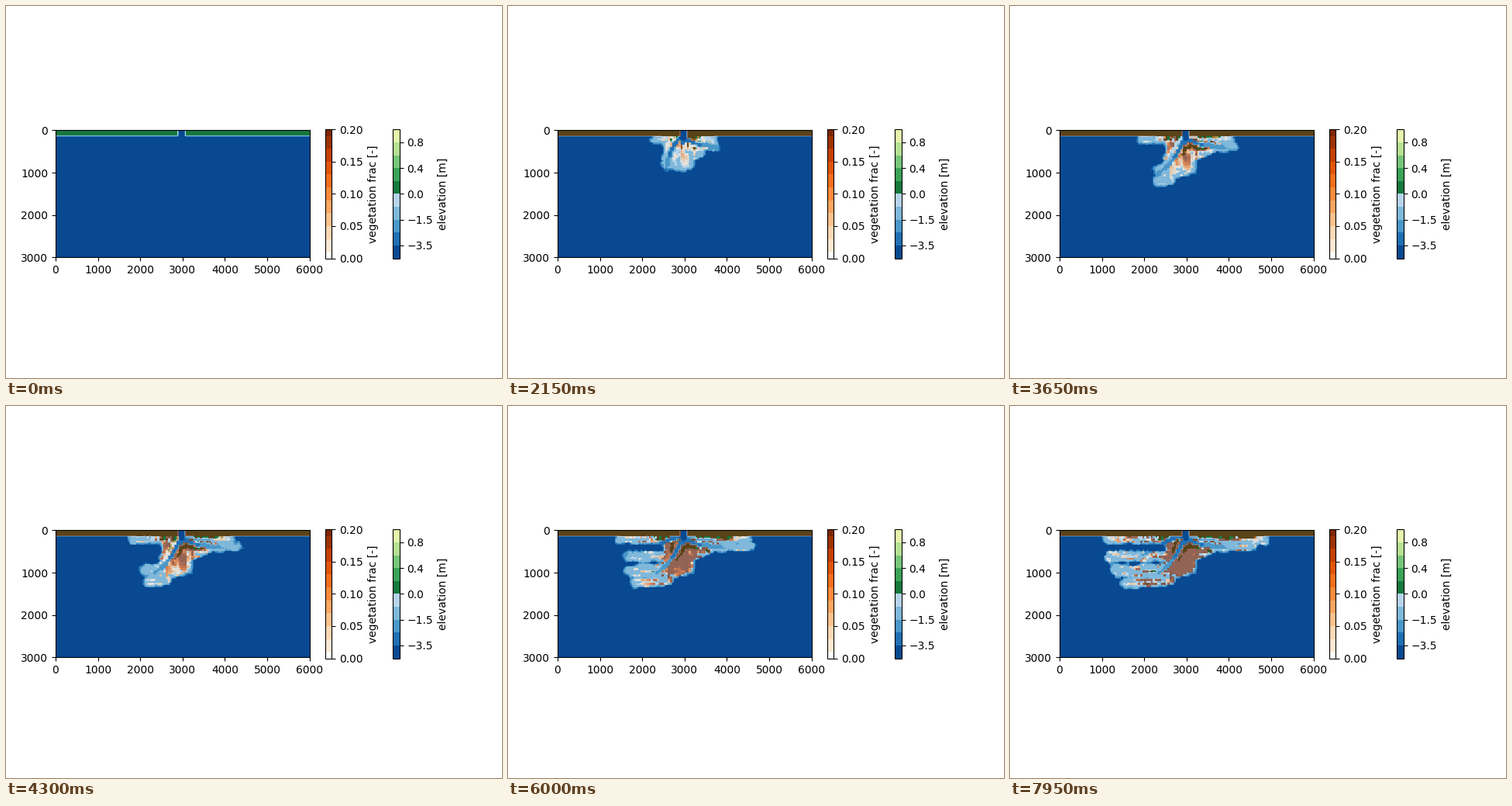
These frames come from a looping animation (640x480 px, 8000 ms). A matplotlib script:

```python
import numpy as np
import matplotlib.pyplot as plt
from matplotlib.animation import FuncAnimation
from matplotlib.cm import ScalarMappable
from matplotlib.colors import BoundaryNorm, ListedColormap

FRAMES, STEP = 160, 50
ROWS, COLS = 60, 120
SEA, VEG_MAX = -5.0, 0.2
APEX = (29.75, 1.0)

# Sand bodies: root, final tip, half width, start and end in s; lengths in 100 m
BODIES = [
    ((29.6, 2.4), (29.6, 2.7), 5.1, -0.1, 1.0),
    ((30.2, 2.0), (30.5, 9.2), 1.8, 0.0, 2.5),
    ((28.4, 5.0), (28.2, 8.9), 2.4, 1.0, 2.9),
    ((26.5, 5.0), (25.5, 10.8), 1.8, 1.2, 3.1),
    ((31.0, 6.2), (35.5, 4.7), 1.5, 1.0, 3.0),
    ((30.5, 2.3), (48.7, 2.3), 1.2, 0.0, 8.0),
    ((30.5, 4.0), (45.6, 4.0), 1.2, 0.0, 5.5),
    ((29.0, 2.3), (10.8, 2.3), 1.2, 0.0, 8.0),
    ((25.0, 6.2), (12.1, 6.2), 1.5, 4.3, 7.2),
    ((26.3, 9.6), (13.0, 9.6), 1.7, 2.8, 8.0),
    ((26.0, 11.7), (15.3, 12.7), 1.5, 2.6, 8.0),
]

# Channels bend from the apex: bend, mouth, half width, start and end in s
CHANNELS = [
    ((29.7, 2.0), (29.7, 3.0), 0.55, 0.0, 9.0),
    ((26.0, 4.0), (25.5, 11.0), 0.45, 1.4, 3.4),
    ((27.3, 8.5), (21.5, 11.2), 0.5, 3.2, 9.0),
    ((25.0, 3.0), (15.5, 6.4), 0.45, 4.4, 6.5),
    ((24.0, 2.5), (14.0, 10.0), 0.5, 6.3, 9.0),
    ((31.0, 4.8), (46.0, 4.1), 0.4, 1.4, 9.0),
    ((32.0, 2.8), (45.0, 2.7), 0.28, 3.5, 9.0),
]

rng = np.random.default_rng(7)
row, col = np.mgrid[:ROWS, :COLS]
X, Y = (col + 0.5) / 2, (row + 0.5) / 2
inlet = (row < 3) & (abs(col - 59) <= 1)
land = (row < 3) & ~inlet
far = np.hypot(X - APEX[0], Y - APEX[1])


def noise(kx, ky):
    """Smooth random field of unit spread, averaged over kx by ky cells."""
    n = rng.random((ROWS, COLS))
    n = sum(np.roll(n, i, 1) for i in range(kx))
    n = sum(np.roll(n, i, 0) for i in range(ky))
    return (n - n.mean()) / n.std()


def streaks():
    """Streaks running down the middle and sideways in the arms."""
    mid = np.exp(-((X - 29) / 4) ** 4)
    return mid * noise(2, 6) + (1 - mid) * noise(9, 1)


def bump(x, y, rx, ry):
    return np.exp(-((X - x) / rx) ** 4 - ((Y - y) / ry) ** 4)


def distance(a, b):
    """Distance of every cell from the segment a to b."""
    a, u = np.array(a), np.subtract(b, a)
    k = np.clip(((X - a[0]) * u[0] + (Y - a[1]) * u[1]) / (u @ u + 1e-9), 0, 1)
    return np.hypot(X - a[0] - k * u[0], Y - a[1] - k * u[1])


def course(bend, mouth):
    """Distance from a quadratic curve between the apex and the mouth."""
    s = np.linspace(0, 1, 15)[:, None]
    pts = (1 - s) ** 2 * APEX + 2 * s * (1 - s) * bend + s * s * mouth
    return np.min([distance(a, b) for a, b in zip(pts, pts[1:])], axis=0)


def body_depth(t):
    """Distance inside the deposit, negative in open water."""
    depth = np.full(X.shape, -9.0)
    for root, tip, half, t0, t1 in BODIES:
        if t > t0:
            p = min(1, (t - t0) / (t1 - t0)) ** 0.8
            head = np.add(root, p * np.subtract(tip, root))
            width = half * min(1, (t - t0) / 0.9) ** 0.5
            depth = np.maximum(depth, width - distance(root, head))
    return depth


COURSES = [course(np.array(bend), np.array(mouth)) for bend, mouth, *_ in CHANNELS]
GRAIN_A, GRAIN_B, ROUGH = streaks(), streaks(), noise(3, 3)
SEEDED = (rng.random(X.shape) > 0.3) | (bump(28.8, 8, 4, 5) > 0.3) | land
ISLAND = bump(28.8, 8.5, 3.6, 4.8)
SHORE = 0.7 * np.exp(-((Y - 1.5) / 1.1) ** 2 - ((X - 30.5) / 9) ** 2)
LEVEE = 0.9 * np.exp(-far / np.where(X > APEX[0], 22, 6))


def target_bed(t, age):
    depth = body_depth(t) + 0.18 * ROUGH
    grain = GRAIN_A * np.cos(0.3 * t) + GRAIN_B * np.sin(0.3 * t)
    ripe = np.clip(age / 2.6, 0, 1)
    bed = -0.72 + 0.24 * grain * (1 - 0.7 * ISLAND * ripe)
    bed += ripe * (0.2 + 0.2 * ISLAND + SHORE)

    near = np.full(X.shape, 99.0)
    cut = np.zeros(X.shape)
    for (*_, half, t0, t1), d in zip(CHANNELS, COURSES):
        if t0 <= t <= t1:
            near = np.minimum(near, d - half)
            floor = np.minimum(-3.8 + 0.2 * far, -1.3) * min(1, half / 0.45)
            cut = np.where(d < half, np.minimum(cut, floor), cut)
    bed += LEVEE * ripe * np.exp(-((near - 0.7) / 0.55) ** 2)
    bed = np.minimum(bed, 0.18)
    bed = np.where(cut < 0, np.minimum(bed, cut), bed)
    bed = np.minimum(bed, -3.2 + 3.4 * np.clip(depth / 0.6, 0, 1))
    return np.where(depth > 0, bed, SEA), depth > 0


def simulate():
    bed = np.where(land, 0.1, SEA)
    veg, age = np.zeros(X.shape), np.zeros(X.shape)
    states = [(bed, veg)]
    for i in range(1, FRAMES):
        goal, wet = target_bed(i * STEP / 1000, age)
        age = age + wet * STEP / 1000
        bed = bed + 0.35 * (goal - bed)
        bed[land], bed[inlet] = 0.1, -4.0
        rate = np.where(bed > 0, 0.25, 0.085)
        grown = veg + rate * veg * (1 - veg / VEG_MAX) + 0.001 * SEEDED
        veg = np.where(bed > -0.5, np.minimum(grown, VEG_MAX), veg)
        veg = np.where(bed < -0.75, 0.6 * veg, veg)
        states.append((bed, veg))
    return states


def levels(bounds, colors):
    return dict(cmap=ListedColormap(colors), norm=BoundaryNorm(bounds, len(colors)))


bed_style = levels(
    [*np.arange(-4.5, 0), *np.linspace(0, 1, 6)],
    np.vstack([plt.cm.Blues(np.linspace(0.9, 0.3, 5)),
               plt.cm.YlGn(np.linspace(0.8, 0.2, 5))]))
oranges = plt.cm.Oranges(np.linspace(0.1, 1, 10))
veg_bounds = [0, *np.arange(0.01, 0.2, 0.02), VEG_MAX]
veg_style = levels(veg_bounds, np.vstack([[1, 1, 1, 0], oranges]))
bar_style = levels(veg_bounds, np.vstack([[1, 1, 1, 1], oranges]))

states = simulate()
fig, ax = plt.subplots(figsize=(6.4, 4.8), dpi=100, facecolor="white")
fig.subplots_adjust(left=0.1, right=0.9)
extent = [0, 6000, 3000, 0]
bed_img = ax.imshow(states[0][0], extent=extent, **bed_style)
veg_img = ax.imshow(states[0][1], extent=extent, alpha=0.65,
                    interpolation="nearest", **veg_style)
ax.set_xticks(range(0, 6001, 1000))
ax.set_yticks(range(0, 3001, 1000))


def bar(style, ticks, label, spacing):
    cb = fig.colorbar(ScalarMappable(**style), ax=ax, shrink=0.45,
                      ticks=ticks, spacing=spacing)
    cb.minorticks_off()
    cb.set_label(label)


bar(bed_style, [-3.5, -1.5, 0, 0.4, 0.8], "elevation [m]", "uniform")
bar(bar_style, np.linspace(0, 0.2, 5), "vegetation frac [-]", "proportional")


def draw(i):
    bed, veg = states[i]
    bed_img.set_data(bed)
    veg_img.set_data(veg)
    return bed_img, veg_img


anim = FuncAnimation(fig, draw, frames=FRAMES, interval=STEP, repeat=True, repeat_delay=0)
plt.show()
```
